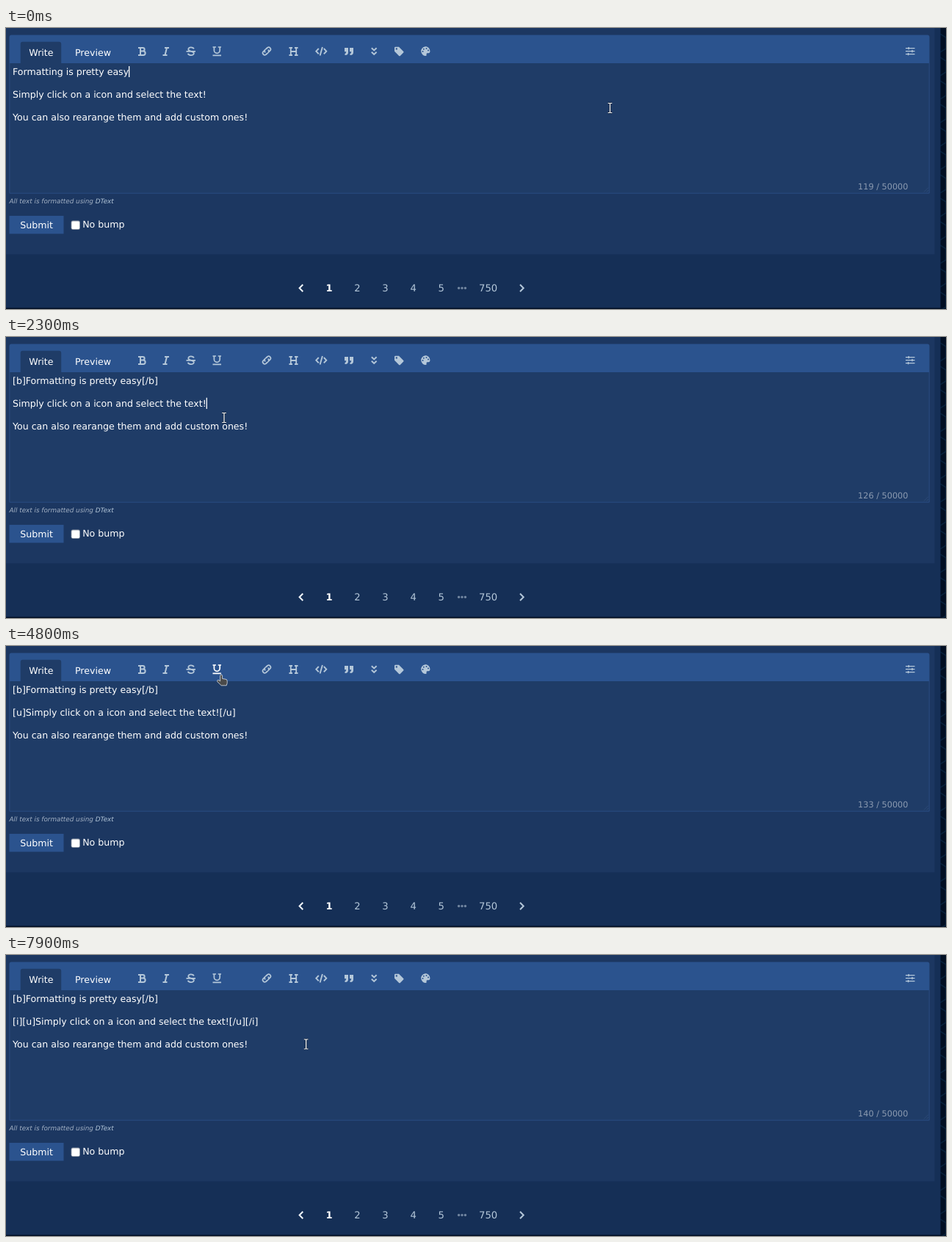
Animation of 1280x383 px, one loop 8000 ms. Source, as an HTML page with a canvas:

```html
<!DOCTYPE html>
<html lang="en">
<head>
<meta charset="utf-8">
<title>Formatting toolbar</title>
<style>
html, body { margin: 0; width: 100%; height: 100%; overflow: hidden; background: #020f23; }
canvas { display: block; }
</style>
</head>
<body>
<canvas id="stage" width="1280" height="383"></canvas>
<script>
const ctx = document.getElementById('stage').getContext('2d');
const LOOP = 8000, TICK = 100;
const SANS = '"DejaVu Sans", Verdana, sans-serif';
const BODY = '12.59px ' + SANS;
const LINK = '#b4c7d9', PANEL = '#1c3761', FIELD = '#1f3c67', BAR = '#2b538e';

// Toolbar icons: centre x, path, stroke width (0 = filled)
const icons = [
  [185, 'M180 27H186.3A2.3 2.3 0 0 1 186.3 31.6H183M186.3 31.6H187A2.65 2.65 0 0 1 187 36.9H180M183 27V37', 2],
  [218, 'M216 27H222M213.5 37H219.5M219 27L216.5 37', 2],
  [252, 'M245.5 31.8H258M255.8 28.6C255 26 248.3 25.4 248.3 29C248.3 31 251 31.5 252 31.8C256 32.6 256 34 255.8 35C254.5 38 248.5 37.5 247.8 34.8', 1.8],
  [287, 'M281.5 26H286M288.7 26H293M283.4 26V30.5A3.9 3.9 0 0 0 291.2 30.5V26M281.5 37.4H293', 1.7],
  [355, 'M353.2 33.3A2.7 2.7 0 0 1 352.5 30L350.2 32.3A2.7 2.7 0 0 0 354 36.1L356 34.1M356.8 29.7A2.7 2.7 0 0 1 357.5 33L359.8 30.7A2.7 2.7 0 0 0 356 26.9L354 28.9', 1.7],
  [391, 'M385.5 27H390M393 27H397.5M385.5 37H390M393 37H397.5M387.8 27V37M395.2 27V37M387.8 32H395.2', 1.8],
  [429, 'M425.8 28L422.3 31.7L425.8 35.4M432.8 28L436.3 31.7L432.8 35.4M430.9 26L427.6 37.4', 1.9],
  [467, 'M461 27h5v6a4 4 0 0 1-4 4h-.5v-2a1.8 1.8 0 0 0 1.6-1.9v-.9h-2.1zM468 27h5v6a4 4 0 0 1-4 4h-.5v-2a1.8 1.8 0 0 0 1.6-1.9v-.9h-2.1z', 0],
  [501, 'M497.8 27.3l3.4 3.2l3.4-3.2M497.8 32.7l3.4 3.2l3.4-3.2', 1.9],
  [535, 'M529 27A1.3 1.3 0 0 1 530.3 25.7H535L541.2 31.9A1.3 1.3 0 0 1 541.2 33.6L536.8 38A1.3 1.3 0 0 1 535.1 38L529 31.8ZM530.6 28.4a1.2 1.2 0 0 0 2.4 0a1.2 1.2 0 0 0-2.4 0z', 0],
  [571, 'M571 25.3A6.3 6.3 0 1 0 572 37.9C573.5 37.6 571.8 35.5 573 34.6C574 33.8 577.4 35.6 577.4 31.6C577.3 28 574.5 25.3 571 25.3ZM566.5 32a1 1 0 0 0 2 0a1 1 0 0 0-2 0zM567.8 28.7a1 1 0 0 0 2 0a1 1 0 0 0-2 0zM571.5 28a1 1 0 0 0 2 0a1 1 0 0 0-2 0zM574 30.6a1 1 0 0 0 2 0a1 1 0 0 0-2 0z', 0],
  [1231, 'M1225 27.6H1237.5M1225 31.6H1237.5M1225 35.6H1237.5M1229.2 26V29.2M1234 30V33.2M1228.6 34V37.2', 1.4]
].map(([x, d, width]) => ({ x, width, path: new Path2D(d) }));

const beam = new Path2D('M-2.8 -6.5H-1L0 -5.9L1 -6.5H2.8M0 -5.9V5.9M-2.8 6.5H-1L0 5.9L1 6.5H2.8');
const hand = new Path2D('M0 1.4A1.5 1.5 0 0 1 3 1.4V5.3L7.2 6A2.5 2.5 0 0 1 9.6 8.4V11.4L8.6 14.6H1.6L-3.7 9.5C-4.8 8-3 6.4-1.5 7.6L0 8.8Z');

// Pointer route: time, x, y
const route = [
  [0, 822.5, 109], [600, 822.5, 109], [700, 823.5, 107], [1500, 181.5, 30.2],
  [1600, 181.5, 30.2], [2000, 301, 90.5], [2200, 301, 90.5], [2300, 297, 110],
  [3500, 297, 110], [4000, 246.7, 32.6], [4200, 246.7, 32.6], [4500, 283, 30],
  [4700, 283, 30], [5100, 338, 89], [5200, 340, 80.5], [5900, 340, 80.5],
  [6200, 366, 91], [6800, 217.5, 36.5], [6900, 218.6, 37], [7100, 218.6, 37],
  [7600, 410, 129], [7700, 410, 129], [7900, 408.6, 121.5], [LOOP, 408.6, 121.5]
];

const FIRST = 'Formatting is pretty easy';
const SECOND = 'Simply click on a icon and select the text!';
// Editor states; the counter grows by one tag pair (7 characters) each time
const states = [
  { at: 0, tags: 0, caret: 0 },
  { at: 300, tags: 0, select: 0 },
  { at: 1600, tags: 1 },
  { at: 2200, tags: 1, caret: 1 },
  { at: 3000, tags: 1, select: 1 },
  { at: 4600, tags: 2 },
  { at: 5100, tags: 2, caret: 1 },
  { at: 5700, tags: 2, select: 1 },
  { at: 7000, tags: 3 }
];

const wrap = (text, tag) => `[${tag}]${text}[/${tag}]`;

function linesFor(tags) {
  let second = SECOND;
  if (tags > 1) second = wrap(second, 'u');
  if (tags > 2) second = wrap(second, 'i');
  return [tags ? wrap(FIRST, 'b') : FIRST, second, 'You can also rearange them and add custom ones!'];
}

function pointerAt(t) {
  const i = route.findIndex(([time]) => time > t);
  const [t0, x0, y0] = route[i - 1], [t1, x1, y1] = route[i];
  const p = (t - t0) / (t1 - t0), k = p * p * (3 - 2 * p);
  return { x: x0 + (x1 - x0) * k, y: y0 + (y1 - y0) * k };
}

function rect(x, y, w, h, color, radius = 0) {
  ctx.fillStyle = color;
  ctx.beginPath();
  ctx.roundRect(x, y, w, h, radius);
  ctx.fill();
}

function label(text, x, y, color = '#fff', font = BODY, align = 'left') {
  ctx.font = font;
  ctx.fillStyle = color;
  ctx.textAlign = align;
  ctx.fillText(text, x, y);
}

function line(path, color, width) {
  ctx.strokeStyle = color;
  ctx.lineWidth = width;
  ctx.stroke(path);
}

// Faint hexagon outlines showing at the right edge of the page
function drawBackdrop() {
  rect(0, 0, 1280, 383, '#020f23');
  for (let y = 8; y < 383; y += 32) {
    line(new Path2D(`M1272 ${y}L1280 ${y + 5}V${y + 20}L1272 ${y + 25}`), '#08213b', 1.5);
  }
}

function drawPage() {
  drawBackdrop();
  rect(0, 0, 1272.5, 381.5, '#152f56');
  rect(0, 0, 1264.5, 308.5, PANEL);
  rect(4.5, 9.5, 1253, 38.5, BAR, [3, 3, 0, 0]);
  rect(19.7, 18.7, 55.5, 29.3, FIELD, [3, 3, 0, 0]);
  label('Write', 31.3, 38);
  label('Preview', 94, 38);

  rect(4.5, 48, 1253, 177.5, FIELD);
  line(new Path2D('M4.9 48V225.2H1257.2V48'), '#2c4f85', 0.9);
  line(new Path2D('M1250 223.5L1256 217.5M1253.5 223.5L1256 221'), '#33527f', 0.7);

  const small = 'italic 8.8px ' + SANS;
  label('All text is formatted using ', 4.5, 238.5, '#a3b1c4', small);
  label('DText', 4.5 + ctx.measureText('All text is formatted using ').width, 238.5, LINK, small);
  rect(4.5, 256, 74, 24.5, BAR);
  label('Submit', 41.5, 273.3, '#fff', BODY, 'center');
  rect(88.6, 262.6, 12.3, 12.3, '#8a94a3', 2.4);
  rect(89.4, 263.4, 10.7, 10.7, '#fff', 1.6);
  label('No bump', 104.2, 272.3);
}

function drawPager() {
  const size = '13.16px ' + SANS;
  line(new Path2D('M404.3 349.7L399.6 354.5L404.3 359.3'), '#eef3f8', 2);
  line(new Path2D('M700 349.7L704.7 354.5L700 359.3'), LINK, 2);
  label('1', 440, 359.3, '#fff', 'bold ' + size, 'center');
  for (let n = 2; n < 6; n++) label(n, 402.2 + 38.1 * n, 359.3, LINK, size, 'center');
  label('750', 656.6, 359.3, LINK, size, 'center');
  for (let n = 0; n < 3; n++) rect(614.9 + 4.4 * n, 352.8, 3.4, 3.4, '#7185a0', 1.7);
}

function drawIcons(pointer) {
  for (const { x, width, path } of icons) {
    const hover = pointer.y < 48 && Math.abs(pointer.x + 2 - x) < 16;
    const color = hover ? '#fff' : LINK;
    if (width) line(path, color, width);
    else {
      ctx.fillStyle = color;
      ctx.fill(path, 'evenodd');
    }
  }
}

function drawEditor({ tags, caret, select }) {
  linesFor(tags).forEach((text, i) => {
    const top = 52 + 30.8 * i;
    ctx.font = BODY;
    const width = ctx.measureText(text).width;
    if (select === i) rect(9, top, width, 15.1, '#fff');
    label(text, 9, top + 12, select === i ? '#3485dd' : '#fff');
    if (caret === i) rect(9 + width - 0.1, top, 1.3, 15.1, '#fff');
  });
  label(`${119 + 7 * tags} / 50000`, 1228.4, 220, '#8c9bb1', '11.28px ' + SANS, 'right');
}

function drawPointer({ x, y }) {
  ctx.save();
  ctx.translate(x, y);
  if (y < 48) {
    ctx.fillStyle = '#4a4a4a';
    ctx.fill(hand);
    line(hand, '#dfe3e7', 0.8);
  } else {
    line(beam, '#14253d', 2.6);
    line(beam, '#fff', 1.2);
  }
  ctx.restore();
}

function frame(now) {
  const t = Math.floor((now % LOOP) / TICK) * TICK;
  const pointer = pointerAt(t);
  ctx.textRendering = 'geometricPrecision';
  drawPage();
  drawPager();
  drawIcons(pointer);
  drawEditor(states.findLast(s => s.at <= t));
  drawPointer(pointer);
  requestAnimationFrame(frame);
}
requestAnimationFrame(frame);
</script>
</body>
</html>
```
